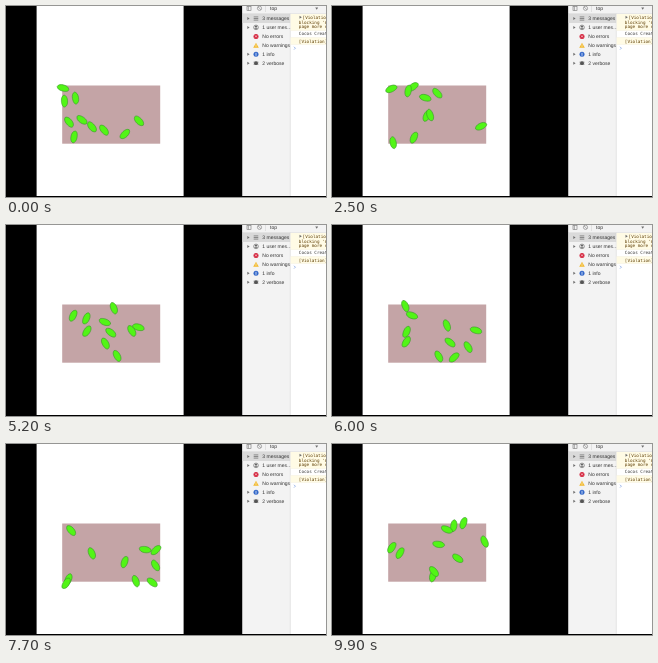
An HTML page that plays this animation: 320x191 px, repeating every 10 s.

```html
<!DOCTYPE html>
<html lang="en">
<head>
<meta charset="utf-8">
<title>Swimming school</title>
<style>
  html, body { margin: 0; width: 100%; height: 100%; overflow: hidden; background: #000; }
  svg { display: block; width: 100vw; height: 100vh; }
  text { text-rendering: geometricPrecision; }
  .side { font: 5px "Liberation Sans", Arial, sans-serif; fill: #333; }
  .log { font: 4.3px "DejaVu Sans Mono", "Liberation Mono", monospace; fill: #333; }
  .log .note { fill: #5c3c00; }
  .arrow { fill: #6e6e6e; }
</style>
</head>
<body>
<svg viewBox="0 0 320 191" preserveAspectRatio="none">
  <defs>
    <path id="body" d="M-6 0C-5.4 -2 -3.2 -3.1 0 -3.1S5.4 -2 6 0S3.2 3.1 0 3.1S-5.4 2 -6 0Z"
      fill="#52f516" stroke="#3c9c2c" stroke-width=".6"/>
    <path id="arrow" class="arrow" d="M0 -1.5L2.3 0L0 1.5Z"/>
  </defs>

  <rect width="320" height="191"/>
  <rect x="30.6" width="147" height="190" fill="#fff"/>
  <rect x="56.2" y="79.5" width="98" height="58.2" fill="#c4a4a6"/>
  <g id="school"></g>

  <rect x="236.5" width="83.5" height="190" fill="#fff"/>
  <rect x="236.5" width="47.7" height="190" fill="#f3f3f3"/>
  <rect x="236.5" width="83.5" height="7.5" fill="#f3f3f3"/>
  <rect x="236.5" y="8" width="47.7" height="9" fill="#dadada"/>
  <path d="M236.5 7.7H320M284.3 7.7V190" stroke="#ccc" stroke-width=".5"/>

  <g fill="none" stroke="#777" stroke-width=".6">
    <rect x="241" y=".4" width="4" height="4"/>
    <circle cx="253.5" cy="2.3" r="2.1"/>
    <path d="M242.4 .4V4.4M252 .8L255 3.8"/>
  </g>
  <path d="M259.5 0V6" stroke="#ccc" stroke-width=".5"/>
  <path class="arrow" d="M309.2 1.4H312.2L310.7 3.8Z"/>

  <g class="side">
    <text x="264" y="4">top</text>
    <text x="256.3" y="14.3">3 messages</text>
    <text x="256.3" y="23.2">1 user mes…</text>
    <text x="256.3" y="32.2">No errors</text>
    <text x="256.3" y="41.2">No warnings</text>
    <text x="256.3" y="50">1 info</text>
    <text x="256.3" y="59">2 verbose</text>
  </g>
  <use href="#arrow" x="241.3" y="12.5"/>
  <use href="#arrow" x="241.3" y="21.4"/>
  <use href="#arrow" x="241.3" y="48.3"/>
  <use href="#arrow" x="241.3" y="57.2"/>

  <path d="M247.7 10.9H252.3M247.7 12.5H252.3M247.7 14.1H252.3" stroke="#666" stroke-width=".7"/>
  <circle cx="250" cy="21.4" r="2.3" fill="none" stroke="#555" stroke-width=".6"/>
  <path d="M248.4 23Q250 21.4 251.6 23Z" fill="#444"/>
  <circle cx="250" cy="20.7" r=".9" fill="#444"/>
  <circle cx="250" cy="30.4" r="2.5" fill="#d4233c"/>
  <path d="M249 29.4L251 31.4M251 29.4L249 31.4" stroke="#fff" stroke-width=".6"/>
  <path d="M250 36.8L252.8 41.8H247.2Z" fill="#f2b92c"/>
  <path d="M250 38.4V40.9" stroke="#fff" stroke-width=".5"/>
  <circle cx="250" cy="48.3" r="2.5" fill="#3267c9"/>
  <path d="M250 46.8V49.8" stroke="#fff" stroke-width=".7"/>
  <circle cx="250" cy="57.2" r="1.9" fill="#555"/>
  <path d="M247.5 56.2H252.5M247.5 58.2H252.5" stroke="#555" stroke-width=".6"/>

  <path d="M284.6 8H320V24.5H284.6ZM284.6 31.5H320V38.5H284.6Z" fill="#fffbe5"/>
  <path d="M284.6 24.5H320M284.6 31.5H320M284.6 38.5H320" stroke="#f3eed8" stroke-width=".4"/>
  <use href="#arrow" x="293.5" y="11.2"/>
  <g class="log">
    <text class="note" x="296.6" y="12.8">[Violation]</text>
    <text class="note" x="292.8" y="17.6">blocking 'm</text>
    <text class="note" x="292.8" y="22.4">page more r</text>
    <text x="292.8" y="29.4">Cocos Creat</text>
    <text class="note" x="292.8" y="36.6">[Violation]</text>
  </g>
  <path d="M288 40.8L289.4 42.2L288 43.6" fill="none" stroke="#5b87d8" stroke-width=".6"/>
</svg>
<script>
const LOOP = 10000, STEP = 100;
const pool = { left: 56, right: 154, top: 80, bottom: 138 };
const school = document.getElementById('school');
const swimmers = [];

let seed = 7;
function random(low, high) {
  seed = (seed * 16807) % 2147483647;
  return low + (high - low) * seed / 2147483647;
}

// Swims straight ahead; at a wall it turns back inside at a random angle.
function trace(x, y, heading) {
  const speed = random(15, 26) * STEP / 1000;
  const path = [];
  for (let t = 0; t < LOOP; t += STEP) {
    path.push({ x, y, heading });
    let dx = Math.cos(heading), dy = Math.sin(heading);
    const hitX = dx < 0 ? x <= pool.left : x >= pool.right;
    const hitY = dy < 0 ? y <= pool.top : y >= pool.bottom;
    if (hitX) dx = -dx;
    if (hitY) dy = -dy;
    if (hitX || hitY) heading = Math.atan2(dy, dx) + random(-.5, .5);
    x += speed * Math.cos(heading);
    y += speed * Math.sin(heading);
  }
  return path;
}

function swim(x, y, degrees) {
  const node = document.createElementNS('http://www.w3.org/2000/svg', 'use');
  node.setAttribute('href', '#body');
  school.append(node);
  swimmers.push({ node, path: trace(x, y, degrees * Math.PI / 180) });
}

swim(57, 82, 15);
swim(58.5, 95, 86);
swim(69.5, 92, 80);
swim(63, 116, 50);
swim(76, 114, 215);
swim(86, 121, 230);
swim(98, 124, 50);
swim(68, 131, -80);
swim(119, 128, 135);
swim(133, 115, 225);

function draw(now) {
  const step = Math.floor((now % LOOP) / STEP);
  for (const { node, path } of swimmers) {
    const { x, y, heading } = path[step];
    node.setAttribute('transform', `translate(${x} ${y}) rotate(${heading * 180 / Math.PI})`);
  }
}

const start = performance.now();
function tick() {
  draw(performance.now() - start);
  requestAnimationFrame(tick);
}
tick();
</script>
</body>
</html>
```
